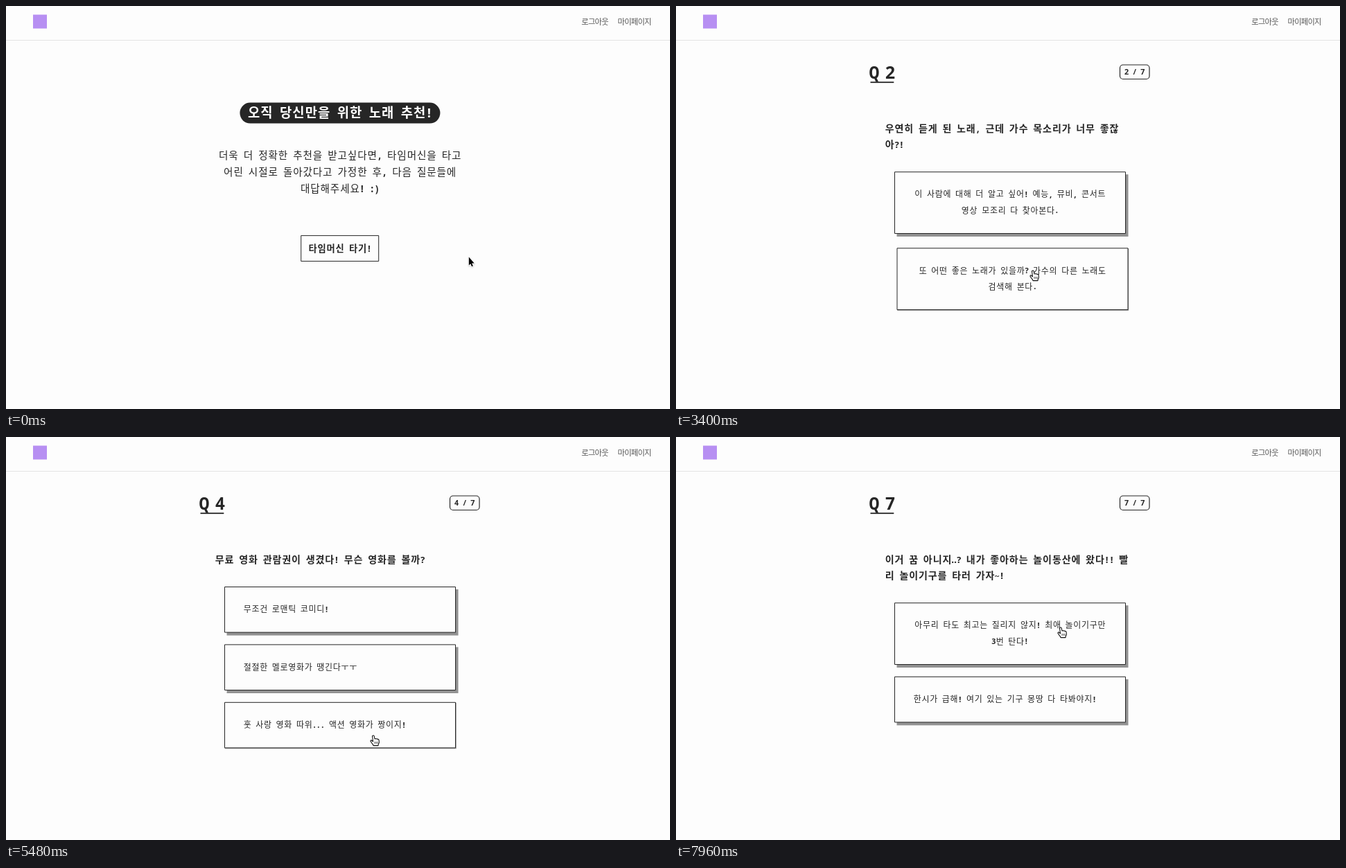
These frames come from a looping animation (958 by 582 pixels, 8000 ms). An HTML page with a canvas:

```html
<!DOCTYPE html>
<html lang="ko">
<head>
<meta charset="utf-8">
<title>노래 추천</title>
<style>
html, body { margin: 0; width: 100%; height: 100%; overflow: hidden; background: #fdfdfd; }
canvas { display: block; width: 100vw; height: 100vh; }
</style>
</head>
<body>
<canvas id="stage" width="958" height="582"></canvas>
<script>
const ctx = document.getElementById('stage').getContext('2d');
const LOOP = 8000, PAPER = '#fdfdfd', INK = '#262626', SHADE = '#929292';
const MID = 481.7;
const HANGUL = '"Noto Sans CJK KR", "Noto Sans KR", "Noto Sans CJK", sans-serif';
const LATIN = '"Noto Sans Mono", "DejaVu Sans Mono", monospace';

// Each page: start time, question lines, options (lines each), option that gets clicked
const pages = [
  { at: 1480, pick: 0, ask: ['학교가 끝났다! 친구랑 어디를 놀러 갈까?!'], options: [
    ['딱지치기, 구슬치기 다 상대해줄게! 당장 친구들이', '모여있는 골목으로 달려간다!'],
    ['뜨신 방에서 빌려온 만화나 보며 뒹굴거리자~']] },
  { at: 2560, pick: 1, ask: ['우연히 듣게 된 노래, 근데 가수 목소리가 너무 좋잖', '아?!'], options: [
    ['이 사람에 대해 더 알고 싶어! 예능, 뮤비, 콘서트', '영상 모조리 다 찾아본다.'],
    ['또 어떤 좋은 노래가 있을까? 가수의 다른 노래도', '검색해 본다.']] },
  { at: 3560, pick: 0, ask: ['내일은 소풍 가는 날! 도시락은 뭘로 쌀까?'], options: [
    ['역시 소풍에는 김밥이지!'],
    ['이번에는 색다르게! 친구들이 모두 부러워할만한', '유부초밥을 싸간다.']] },
  { at: 4480, pick: 2, ask: ['무료 영화 관람권이 생겼다! 무슨 영화를 볼까?'], options: [
    ['무조건 로맨틱 코미디!'],
    ['절절한 멜로영화가 땡긴다ㅜㅜ'],
    ['훗 사랑 영화 따위... 액션 영화가 짱이지!']] },
  { at: 5600, pick: 1, ask: ['더운 여름날, 친구랑 어떤 아이스크림을 먹으러 갈까?'], options: [
    ['그냥 편의점에서 두보미나 사먹을까?'],
    ['31가지 골라 먹는 재미가 있는 거!']] },
  { at: 6560, pick: 0, ask: ['오늘은 내 생일! 무슨 선물을 받고 싶어?'], options: [
    ['전부터 갖고 싶던 게임기! 친구들을 모두 불러서', '하루종일 게임한다!'],
    ['예쁜 옷이랑 새 신발! 내일 학교에 입고 가서', '잔뜩 자랑해야지~']] },
  { at: 7640, pick: -1, ask: ['이거 꿈 아니지‥? 내가 좋아하는 놀이동산에 왔다!! 빨', '리 놀이기구를 타러 가자~!'], options: [
    ['아무리 타도 최고는 질리지 않지! 최애 놀이기구만', '3번 탄다!'],
    ['한시가 급해! 여기 있는 기구 몽땅 다 타봐야지!']] }
];

// Pointer stops: time, x, y of the hotspot
const route = [
  [0, 667, 361.5], [60, 667, 361.5], [1130, 514.5, 345.5], [1640, 514.5, 345.5],
  [2280, 520.5, 296], [2680, 520.5, 296], [3200, 515, 382], [3620, 515, 382],
  [4250, 538, 278], [4720, 538, 278], [5250, 530, 431], [5880, 530, 431],
  [6040, 521.5, 363], [6220, 518, 350], [6800, 518, 350], [7300, 555, 275], [LOOP, 555, 275]
];

const arrow = new Path2D('M.8 1V13L3.3 10.7L5 14.7L6.8 13.9L5.1 10H8.6Z');
const hand = new Path2D('M-1.5 1Q-1.5 0 -.3 0Q1 0 1.2 1L2 5Q3 4 4 5Q5.2 4.3 6 5.4Q7.6 5 8 6.5L8.4 9.5Q8.4 11 7.3 12.4L7 14.6H0L-.6 13Q-2.5 11 -4 8.2Q-4 6.6 -2.6 7L-.5 8.8Z');
const knuckles = new Path2D('M2 9V12M4 9V12M6 9V12');

const clamp = v => Math.min(1, Math.max(0, v));
const isWide = ch => ch.charCodeAt(0) > 0x3000;
const units = str => [...str].reduce((n, ch) => n + (isWide(ch) ? 1 : 0.5), 0);

// Fixed-pitch lettering: a syllable takes one cell, anything else half a cell
function text(str, x, cy, pitch, { weight = 300, color = INK, size = pitch * 1.02, centre = false } = {}) {
  if (centre) x -= units(str) * pitch / 2;
  ctx.fillStyle = color;
  ctx.textAlign = 'center';
  for (const ch of str) {
    const wide = isWide(ch), cell = wide ? pitch : pitch / 2;
    const px = wide ? size : size * 0.92;
    ctx.font = wide ? `${weight} ${px}px ${HANGUL}` : `700 ${px}px ${LATIN}`;
    ctx.fillText(ch, x + cell / 2, cy + px * 0.37);
    x += cell;
  }
}

function panel(x, y, w, h, fill, r = 0, line = 1) {
  ctx.beginPath();
  ctx.roundRect(x, y, w, h, r);
  ctx.fillStyle = fill;
  ctx.fill();
  ctx.strokeStyle = INK;
  ctx.lineWidth = line;
  if (line) ctx.stroke();
}

function layout(page) {
  let y = 216.5 + (page.ask.length - 1) * 23.2;
  return page.options.map(lines => {
    const box = { x: 315.5, y, w: 333, h: 65.6 + (lines.length - 1) * 23.2, lines };
    y += box.h + 17.8;
    return box;
  });
}
pages.forEach(p => { p.boxes = layout(p); });
const button = { x: 425.7, y: 331.6, w: 112, h: 37 };

function pointerAt(t) {
  const i = Math.max(1, route.findIndex(stop => stop[0] > t));
  const [t0, x0, y0] = route[i - 1], [t1, x1, y1] = route[i];
  const u = clamp((t - t0) / (t1 - t0)), k = u * u * (3 - 2 * u);
  return { x: x0 + (x1 - x0) * k, y: y0 + (y1 - y0) * k };
}

const over = (p, b) => p.x > b.x && p.x < b.x + b.w && p.y > b.y && p.y < b.y + b.h - 3;

function header() {
  ctx.fillStyle = PAPER;
  ctx.fillRect(0, 0, 958, 582);
  ctx.fillStyle = '#e4e4e4';
  ctx.fillRect(0, 49, 958, 1);
  ctx.fillStyle = '#b78ff2';
  ctx.fillRect(39, 12.5, 20, 20);
  const nav = { weight: 400, color: '#555', size: 11.2 };
  text('로그아웃', 830.6, 23, 9.65, nav);
  text('마이페이지', 882.8, 23, 9.65, nav);
}

function intro(hot) {
  panel(337.4, 139.6, 289, 30, INK, 15, 0);
  text('오직 당신만을 위한 노래 추천!', MID, 154.5, 18.4, { weight: 700, color: '#fff', centre: true });
  ['더욱 더 정확한 추천을 받고싶다면, 타임머신을 타고',
   '어린 시절로 돌아갔다고 가정한 후, 다음 질문들에',
   '대답해주세요! :)'].forEach((line, i) => text(line, MID, 216 + i * 24, 14.3, { centre: true }));
  panel(button.x, button.y, button.w, button.h, hot ? INK : PAPER);
  text('타임머신 타기!', MID, 350, 13, { weight: 700, color: hot ? '#fff' : INK, centre: true });
}

function option(box, down, lift, t) {
  const pressed = t >= down && t < lift;
  const depth = t < lift ? 1 - clamp((t - down) / 100) : clamp((t - lift) / 130);
  const drop = 0.8 + 3.2 * depth, shift = pressed ? 3.5 : 0;
  const x = box.x + shift, y = box.y + shift;
  ctx.fillStyle = SHADE;
  ctx.fillRect(x - 0.5 + drop * 0.88, y - 0.5 + drop, box.w + 1, box.h + 1);
  panel(x, y, box.w, box.h, PAPER);
  const many = box.lines.length > 1;
  box.lines.forEach((line, i) =>
    text(line, many ? x + 166.4 : x + 26.8, y + 32.3 + i * 23.2, 11.74, { centre: many }));
}

function quiz(index, t) {
  const page = pages[index], n = index + 1;
  text('Q ' + n, 280.2, 95.7, 23, { weight: 700, size: 27 });
  ctx.fillStyle = INK;
  ctx.fillRect(280.5, 109.3, 33.8, 1.8);
  panel(640.5, 85, 42.5, 20.5, PAPER, 4.5, 1.2);
  text(n + ' / 7', 661.7, 95.3, 11.7, { centre: true });
  page.ask.forEach((line, i) => text(line, 301.3, 177 + i * 23.2, 13.78, { weight: 700 }));
  const lift = index < pages.length - 1 ? pages[index + 1].at - 120 : Infinity;
  page.boxes.forEach((box, i) => {
    const own = i === page.pick;
    option(box, own ? lift - 160 : Infinity, own ? lift : Infinity, t);
  });
}

function pointer(p, pointing) {
  ctx.save();
  ctx.translate(p.x, p.y);
  ctx.lineJoin = 'round';
  if (pointing) {
    ctx.fillStyle = '#fff';
    ctx.strokeStyle = '#111';
    ctx.lineWidth = 1.1;
    ctx.fill(hand);
    ctx.stroke(hand);
    ctx.lineWidth = 0.7;
    ctx.stroke(knuckles);
  } else {
    ctx.strokeStyle = '#fff';
    ctx.lineWidth = 1.8;
    ctx.shadowColor = 'rgba(0,0,0,.2)';
    ctx.shadowBlur = 2;
    ctx.shadowOffsetY = 1;
    ctx.stroke(arrow);
    ctx.shadowColor = 'transparent';
    ctx.fillStyle = '#000';
    ctx.fill(arrow);
  }
  ctx.restore();
}

function draw(t) {
  const p = pointerAt(t);
  const index = pages.filter(page => t >= page.at).length - 1;
  const targets = index < 0 ? [button] : pages[index].boxes;
  const pointing = targets.some(b => over(p, b));
  header();
  if (index < 0) intro(pointing);
  else quiz(index, t);
  pointer(p, pointing);
}

const start = performance.now();
function tick() {
  draw((performance.now() - start) % LOOP);
  requestAnimationFrame(tick);
}
tick();
</script>
</body>
</html>
```
